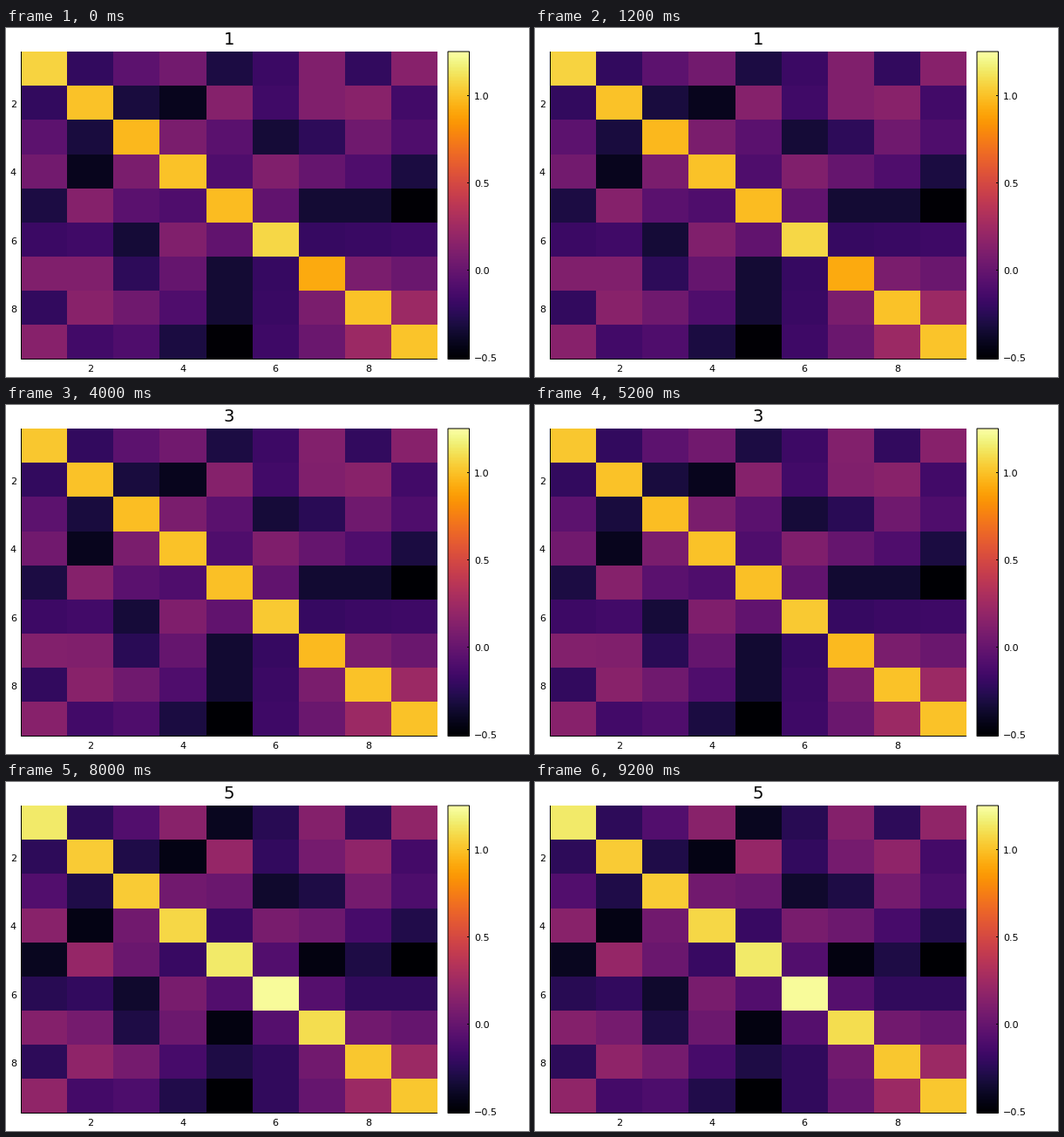
A matplotlib script for the animation above (10 s loop, 600 by 400 pixels).

```python
import numpy as np
import matplotlib.pyplot as plt
from matplotlib.animation import FuncAnimation
from matplotlib.patches import Rectangle

W, H, DPI = 600, 400, 100
N, STEPS = 9, 5
LEFT, RIGHT, TOP, BOTTOM = 17, 495, 27, 379
BAR_L, BAR_R = 507, 531.5
VMIN, VMAX = -0.505, 1.252

plt.rcParams["font.family"] = "DejaVu Sans"

# Correlations above the diagonal, in hundredths, row by row
UPPER = [-21, -4, 5, -30, -17, 12, -21, 14,
         -32, -41, 14, -15, 12, 15, -15,
         9, -5, -33, -25, 4, -10,
         -10, 11, 0, -10, -31,
         -2, -36, -35, -50,
         -20, -18, -16,
         9, 2,
         23]
corr = np.zeros((N, N))
corr[np.triu_indices(N, 1)] = np.array(UPPER) / 100
corr += corr.T + np.eye(N)

# Excess variance that fades out, and two factors that enter at the end
excess = np.array([6, 0, -3, 0, -2, 8, -8, 0, 1]) / 100
factors = np.array([[37, -10, -15, 28, -33, -10, 10, -10, 10],
                    [-10, -15, -10, 0, -20, 47, 30, -10, -10]]) / 100


def estimate(i):
    """Covariance estimate: settles on the correlations, then jumps away."""
    if i == STEPS - 1:
        return corr + factors.T @ factors
    scale = np.sqrt(1 + excess * (1 - i / (STEPS - 2)))
    return corr * np.outer(scale, scale)


fig = plt.figure(figsize=(W / DPI, H / DPI), dpi=DPI, facecolor="white")
ax = fig.add_axes([0, 0, 1, 1])
ax.set_xlim(0, W)
ax.set_ylim(H, 0)
ax.axis("off")


def block(x, y, w, h):
    ax.add_patch(Rectangle((x, y), w, h, fc="black", ec="none",
                           antialiased=False, zorder=3))


def label(x, y, text, ha="center", size=8):
    return ax.text(x, y, text, ha=ha, va="baseline", fontsize=size)


# Cell edges on whole pixels
xs = np.round(np.linspace(LEFT, RIGHT, N + 1) + 0.1)
ys = np.round(np.linspace(TOP, BOTTOM, N + 1) + 0.2)
heat = ax.pcolormesh(xs, ys, estimate(0), cmap="inferno", vmin=VMIN, vmax=VMAX,
                     antialiased=False, edgecolors="none")
block(LEFT, TOP, 1, BOTTOM - TOP + 1)
block(LEFT, BOTTOM, RIGHT - LEFT, 1)

for k in range(2, N, 2):
    label(LEFT + (k - 0.5) * (RIGHT - LEFT) / N, 394, str(k))
    label(12, TOP + (k - 0.5) * (BOTTOM - TOP) / N + 5.5, str(k), ha="right")

# Colour bar
ax.pcolormesh([BAR_L, BAR_R], np.linspace(TOP, BOTTOM, 257),
              np.linspace(1, 0, 256)[:, None], cmap="inferno", vmin=0, vmax=1,
              antialiased=False, edgecolors="none")
ax.add_patch(Rectangle((BAR_L, TOP), BAR_R - BAR_L, BOTTOM - TOP + 0.5,
                       fill=False, ec="black", lw=72 / DPI, snap=False, zorder=3))
for v in (-0.5, 0, 0.5, 1):
    y = TOP + (VMAX - v) / (VMAX - VMIN) * (BOTTOM - TOP)
    block(BAR_R - 3, np.floor(y), 3, 1)
    label(537, y + 4.5, f"{v:.1f}".replace("-", "\u2212"), ha="left")

title = label((LEFT + RIGHT) / 2, 19, "1", size=14)


def update(i):
    heat.set_array(estimate(i))
    title.set_text(str(i + 1))
    return heat, title


anim = FuncAnimation(fig, update, frames=STEPS, interval=2000,
                     repeat=True, repeat_delay=0)
plt.show()
```
